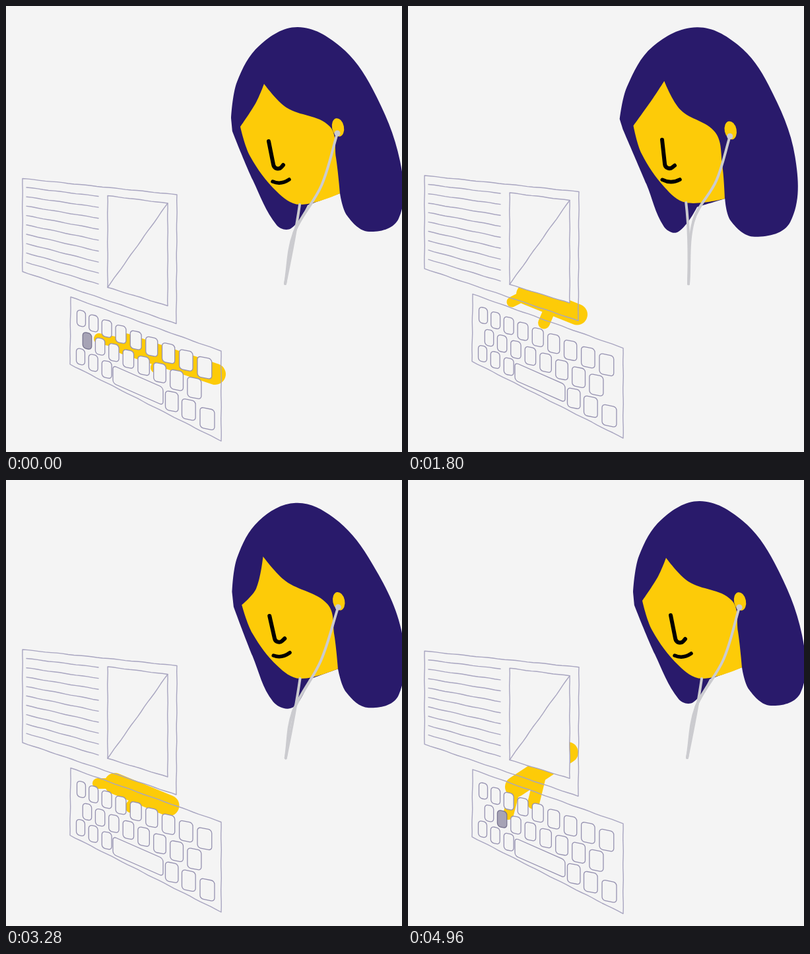
An HTML page with a canvas for the animation above (5000 ms loop, 600 px wide and 676 px high).

```html
<!DOCTYPE html>
<html lang="en">
<head>
<meta charset="utf-8">
<title>Typing to the beat</title>
<style>
html, body { margin: 0; width: 100%; height: 100%; overflow: hidden; background: #f4f4f4; }
canvas { display: block; }
</style>
</head>
<body>
<canvas id="stage" width="600" height="676"></canvas>
<script>
const ctx = document.getElementById('stage').getContext('2d');
const LOOP = 5000, STEP = 40, BEATS = 3, POSES = 20;
const BG = '#f4f4f4', NAVY = '#291a6b', YELLOW = '#fdcb08', CORD = '#cbcbcf';
const LINE = '#a8a5c0', KEY = '#9591b0', PRESSED = '#a6a3b5';

// Key points of the head, as flat x, y lists
const upright = {
  hair: [410,332, 374,264, 343,190, 341,170, 350,115, 384,60, 442,32, 506,61, 555,125, 597,235, 595,322, 550,342, 517,318, 506,284, 457,302, 432,337],
  face: [355,183, 379,146, 391,118, 425,154, 490,182, 500,230, 506,284, 445,301, 410,281, 370,228],
  nose: [398,205, 408,255, 420,241], mouth: [404,266, 429,263],
  wire: [502,193, 478,272, 436,345, 423,421]
};
const turned = {
  hair: [320,340, 323,288, 275,182, 260,176, 277,145, 330,67, 425,33, 482,53, 520,104, 555,210, 532,343, 450,373, 406,350, 403,316, 381,313, 340,359],
  face: [301,177, 350,118, 380,101, 377,168, 392,220, 405,278, 402,316, 350,289, 325,256, 306,212],
  nose: [346,196, 338,244, 356,244], mouth: [329,255, 361,263],
  wire: [445,211, 435,242, 422,269, 431,422]
};
const away = {
  hair: [288,324, 290,262, 271,182, 255,187, 276,145, 325,68, 404,33, 440,37, 502,84, 553,240, 532,343, 455,372, 403,346, 392,313, 371,305, 318,355],
  face: [301,160, 340,129, 374,109, 376,172, 388,222, 397,275, 392,313, 362,300, 328,260, 303,205],
  nose: [341,187, 336,241, 353,241], mouth: [327,254, 358,257],
  wire: [434,213, 431,238, 423,260, 432,428]
};
const dipped = {
  hair: [289,340, 301,265, 301,195, 299,191, 303,152, 350,75, 418,49, 455,44, 522,92, 568,210, 540,340, 452,376, 424,355, 423,302, 401,289, 318,363],
  face: [332,175, 362,147, 386,113, 394,160, 413,207, 424,255, 424,302, 388,273, 365,246, 347,210],
  nose: [363,199, 350,245, 375,244], mouth: [376,260, 398,257],
  wire: [459,210, 448,257, 422,312, 431,411]
};
const swung = {
  hair: [388,347, 372,275, 351,200, 347,170, 351,125, 380,68, 430,43, 467,45, 530,92, 605,205, 595,337, 548,355, 511,333, 494,293, 466,303, 445,366],
  face: [364,208, 379,221, 385,110, 420,151, 478,206, 490,252, 494,292, 447,301, 415,284, 384,247],
  nose: [403,209, 415,245, 429,238], mouth: [409,266, 433,258],
  wire: [507,192, 474,280, 430,374, 426,423]
};
const headTrack = [[0, upright], [6, turned], [10, away], [13, dipped], [17, swung], [POSES, upright]];

// Hand joints: elbow, wrist, fingertip, thumb
const handTrack = [
  [0, [317,558, 180,512, 141,504, 228,548]],
  [800, [254,448, 145,437, 128,470, 186,488]],
  [1400, [312,575, 230,568, 211,594, 270,604]],
  [2200, [200,360, 130,306, 104,303, 142,357]],
  [2720, [218,462, 155,414, 123,412, 154,451]],
  [3840, [275,525, 175,506, 155,508, 225,540]],
  [4960, [242,413, 163,465, 152,507, 190,490]]
];
const sinkTrack = [[0, [4.5]], [500, [1]], [2000, [0]], [3840, [0]], [4300, [3]], [4960, [2.3]]];
const scrollTrack = [[1800, [0]], [2200, [7]], [2600, [0]]];
// [from, to, row, key]
const presses = [[0, 80, 1, 0], [760, 880, 0, 0], [3800, 3920, 1, 1], [4880, LOOP, 1, 1]];

const mix = (a, b, f) => a.map((v, i) => v + (b[i] - v) * f);
const ease = f => (1 - Math.cos(Math.PI * f)) / 2;

function find(track, t) {
  let i = 0;
  while (i < track.length - 2 && t >= track[i + 1][0]) i++;
  const [t0, a] = track[i], [t1, b] = track[i + 1];
  const raw = Math.max(0, Math.min(1, (t - t0) / (t1 - t0)));
  return { a, b, raw, f: ease(raw) };
}
const sample = (track, t) => { const s = find(track, t); return mix(s.a, s.b, s.f); };

// Smooth path through points; handles follow the neighbours, corners have none
function curve(list, closed, corners = [], count) {
  const n = list.length / 2;
  const at = i => closed ? (i + n) % n : Math.max(0, Math.min(n - 1, i));
  const p = i => [list[2 * at(i)], list[2 * at(i) + 1]];
  const dir = i => {
    if (corners.includes(at(i))) return [0, 0];
    const a = p(i - 1), b = p(i + 1), d = Math.hypot(b[0] - a[0], b[1] - a[1]) || 1;
    return [(b[0] - a[0]) / d, (b[1] - a[1]) / d];
  };
  ctx.beginPath();
  ctx.moveTo(...p(0));
  for (let i = 0; i < (count || (closed ? n : n - 1)); i++) {
    const a = p(i), b = p(i + 1), u = dir(i), v = dir(i + 1);
    const h = Math.hypot(b[0] - a[0], b[1] - a[1]) * .35;
    ctx.bezierCurveTo(a[0] + u[0] * h, a[1] + u[1] * h, b[0] - v[0] * h, b[1] - v[1] * h, b[0], b[1]);
  }
  if (closed) ctx.closePath();
}

function fill(color) { ctx.fillStyle = color; ctx.fill(); }

function stroke(color, width) {
  ctx.strokeStyle = color;
  ctx.lineWidth = width;
  ctx.stroke();
}

function limb(width, ...points) {
  ctx.beginPath();
  points.forEach(p => ctx.lineTo(...p));
  stroke(YELLOW, width);
}

function drawHand(t) {
  const [ex, ey, wx, wy, fx, fy, tx, ty] = sample(handTrack, t);
  limb(32, [ex, ey], [wx, wy]);
  limb(16, [wx, wy], [fx, fy]);
  limb(18, [(ex + wx) / 2, (ey + wy) / 2], [tx, ty]);
}

// Straight pen lines with a faint wobble
function sketch(list, closed, solid) {
  const n = list.length / 2;
  ctx.beginPath();
  ctx.moveTo(list[0], list[1]);
  for (let i = 0; i < (closed ? n : n - 1); i++) {
    const j = (i + 1) % n, dx = list[2 * j] - list[2 * i], dy = list[2 * j + 1] - list[2 * i + 1];
    const len = Math.hypot(dx, dy), cuts = Math.ceil(len / 9);
    for (let k = 1; k <= cuts; k++) {
      const w = k < cuts ? .3 * Math.sin(k * 1.3 + len) : 0;
      ctx.lineTo(list[2 * i] + dx * k / cuts - dy / len * w, list[2 * i + 1] + dy * k / cuts + dx / len * w);
    }
  }
  if (closed) ctx.closePath();
  if (solid) fill(BG);
  stroke(LINE, 1.4);
}

function key(x, y, w, h, slope, down) {
  ctx.save();
  ctx.transform(1, slope, 0, 1, x, y);
  ctx.beginPath();
  ctx.roundRect(-w / 2, -h / 2, w, h, 5);
  ctx.restore();
  fill(down ? PRESSED : BG);
  stroke(down ? '#77738f' : KEY, 1.3);
}

// Row: first x, first y, slope, x step, x growth, key slots
const rows = [
  [114, 469, .4, 18, .67, [0, 1, 2, 3, 4, 5, 6, 7, 8]],
  [123, 503, .44, 19, .6, [0, 1, 2, 3, 4, 5, 6, 7]],
  [113, 527, .49, 18.6, .63, [0, 1, 2, 6.15, 7.1, 8.1]]
];

function drawDevice(t) {
  sketch([25,257, 259,281.5, 258,477, 25,398], true);
  const shift = sample(scrollTrack, t)[0];
  for (let i = 0; i < 9; i++) {
    sketch([31, 270.5 + 14.2 * i + shift, 140, 284 + 16.6 * i + shift], false);
  }
  sketch([154,283, 245,294.5, 245,450, 154,422], true, true);
  sketch([245,294.5, 154,422], false);
  sketch([98,436.5, 326,518.5, 326,655, 97,538.5], true);
  rows.forEach(([x0, y0, slope, step, grow, slots], r) => slots.forEach(i => {
    const x = x0 + step * i + grow * i * i, s = x - 114;
    const down = presses.some(p => t >= p[0] && t < p[1] && p[2] === r && p[3] === i);
    key(x, y0 + slope * (x - x0), 13 + s * .047, 24 + s * .037, .2, down);
  }));
  key(200, 570.5, 76, 27, .44, false);
}

function drawHead(t) {
  const phase = Math.round(t * BEATS / LOOP * POSES) % POSES;
  const s = find(headTrack, phase);
  const part = name => mix(s.a[name], s.b[name], s.f);
  const face = part('face'), nose = part('nose'), mouth = part('mouth'), wire = part('wire');
  const [bx, by] = wire, [endX, endY] = wire.slice(6), [chinX, chinY] = face.slice(14);
  ctx.save();
  if (s.a === dipped) ctx.translate(0, -13 * Math.sin(Math.PI * s.raw));

  curve(wire);
  stroke(CORD, 4);
  curve(part('hair'), true, [2, 3, 13, 14]);
  fill(NAVY);
  curve(face, true, [0, 2, 6]);
  fill(YELLOW);
  ctx.beginPath();
  ctx.ellipse(bx + 1, by - 9, 9, 14, -.2, 0, 7);
  fill(YELLOW);

  // Only the first part of the wire hangs in front of the hair
  curve(wire, false, [], 2);
  stroke(CORD, 4);
  ctx.beginPath();
  ctx.moveTo(chinX, chinY);
  ctx.quadraticCurveTo((chinX + endX) / 2 + 4, (chinY + endY) / 2 - 12, endX, endY);
  stroke(CORD, 4);
  ctx.beginPath();
  ctx.arc(bx, by, 4.5, 0, 7);
  fill(CORD);

  ctx.beginPath();
  ctx.moveTo(nose[0], nose[1]);
  ctx.arcTo(nose[2], nose[3], nose[4], nose[5], 7);
  ctx.lineTo(nose[4], nose[5]);
  stroke('#000', 6);
  ctx.beginPath();
  ctx.moveTo(mouth[0], mouth[1]);
  ctx.quadraticCurveTo((mouth[0] + mouth[2]) / 2, (mouth[1] + mouth[3]) / 2 + 7, mouth[2], mouth[3]);
  stroke('#000', 5.5);
  ctx.restore();
}

function draw(t) {
  ctx.fillStyle = BG;
  ctx.fillRect(0, 0, 600, 676);
  drawHand(t);
  ctx.save();
  ctx.translate(0, sample(sinkTrack, t)[0]);
  drawDevice(t);
  ctx.restore();
  drawHead(t);
}

ctx.lineCap = ctx.lineJoin = 'round';
const start = performance.now();
function tick() {
  const t = (performance.now() - start) % LOOP;
  draw(Math.floor(t / STEP) * STEP);
  requestAnimationFrame(tick);
}
tick();
</script>
</body>
</html>
```
